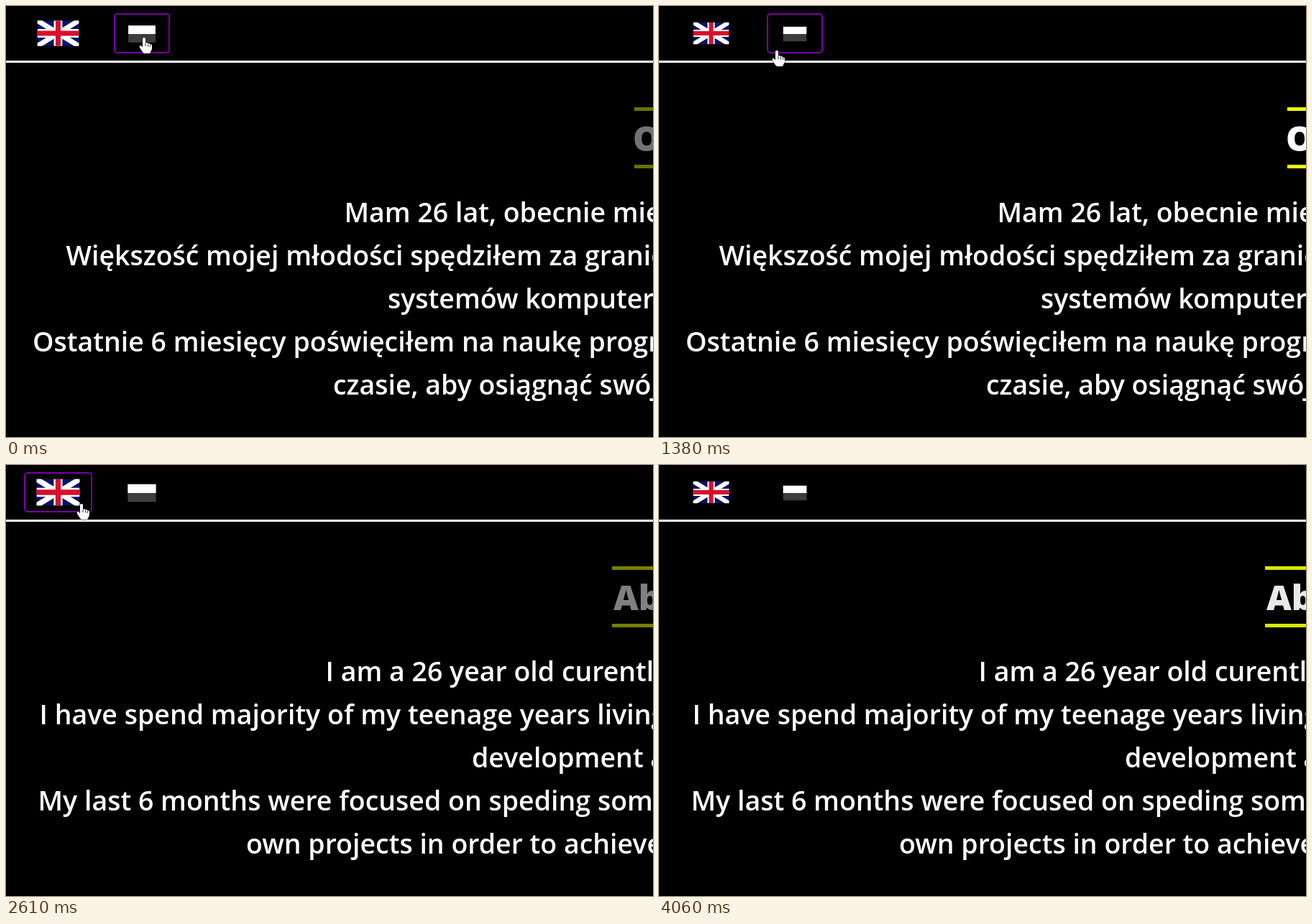
Recreate the animation shown at these times as an HTML page. Size 900x600 px, loop 4080 ms.

```html
<!DOCTYPE html>
<html lang="pl">
<head>
<meta charset="utf-8">
<title>Language switch</title>
<style>
  html, body { margin: 0; width: 100%; height: 100%; overflow: hidden; background: #000; }
  svg { display: block; }
  text { font: 600 37.5px "Open Sans", "Noto Sans", sans-serif; fill: #fff; }
  .title text { font-weight: 800; font-size: 48px; }
  .title rect { fill: #ebff00; }
  .box { fill: none; stroke: #7800a5; stroke-width: 2; }
</style>
</head>
<body>
<svg width="900" height="600" viewBox="0 0 900 600">
  <rect y="76" width="900" height="3" fill="#fff"/>

  <rect class="box" x="26" y="11" width="93" height="54" rx="4"/>
  <rect class="box" x="151" y="11" width="76" height="54" rx="4"/>

  <svg x="0" y="0" width="900" height="76">
    <g class="flag" data-at="72.5,38">
      <clipPath id="edge"><rect x="-24.5" y="-15" width="49" height="30"/></clipPath>
      <g clip-path="url(#edge)">
        <rect x="-24.5" y="-15" width="49" height="30" fill="#04146e"/>
        <path d="M-24.5-15L24.5 15M-24.5 15L24.5-15" stroke="#fff" stroke-width="6"/>
        <path d="M0-15V15M-24.5 0H24.5" stroke="#fff" stroke-width="10"/>
        <path d="M0-15V15M-24.5 0H24.5" stroke="#d8102c" stroke-width="6"/>
      </g>
    </g>
    <g class="flag" data-at="189,39">
      <rect x="-16" y="-10" width="32" height="20" fill="#3d3d3d"/>
      <rect x="-16" y="-10" width="32" height="10" fill="#fff"/>
    </g>
  </svg>

  <g class="page"></g>
  <g class="page"></g>

  <g id="hand">
    <path d="M-2 1Q0-1 2 1V8Q4 6 5.5 8.5Q7.5 7 8.5 9.5Q11 8.5 11 12V16L9 20Q9 22 7 22H1Q-1 22-2 20L-6 14Q-7 10-4 11.500L-2 13Z"
      fill="#fff" stroke="#000" stroke-width="1" paint-order="stroke"/>
    <path d="M2 8V12M5.500 9V12.500M8.500 10V13" stroke="#000" stroke-width=".8"/>
  </g>
</svg>
<script>
const LOOP = 4080, PERIOD = 960, SWITCH = 2300, EXIT = 3230;

const pages = [
  { left: 874, title: [872, "O mnie"], lines: [
    [470.5, "Mam 26 lat, obecnie mieszkam"],
    [83.5, "Większość mojej młodości spędziłem za granicą"],
    [531, "systemów komputerowych"],
    [37, "Ostatnie 6 miesięcy poświęciłem na naukę programowania"],
    [455, "czasie, aby osiągnąć swój cel"]] },
  { left: 843, title: [845, "About me"], lines: [
    [444.5, "I am a 26 year old curently"],
    [46.5, "I have spend majority of my teenage years living"],
    [648, "development and"],
    [44.5, "My last 6 months were focused on speding some time"],
    [334, "own projects in order to achieve my"]] }
];

// Pointer tip: time, x, y
const path = [
  [0, 192, 44], [860, 214, 51], [1380, 164, 62], [1980, 98, 51],
  [2610, 105, 54], [2800, 108, 60], [EXIT, 150, 560]
];

const all = s => [...document.querySelectorAll(s)];
const groups = all(".page"), flags = all(".flag"), boxes = all(".box");
const hand = document.getElementById("hand");
const show = (el, on) => el.setAttribute("visibility", on ? "visible" : "hidden");
const label = ([x, s], y) => `<text x="${x}" y="${y}">${s}</text>`;

pages.forEach((p, i) => {
  const bar = y => `<rect x="${p.left}" y="${y}" width="200" height="5"/>`;
  groups[i].innerHTML =
    `<g class="title">${bar(141)}${bar(221)}${label(p.title, 202)}</g>` +
    p.lines.map((l, n) => label(l, 301 + 60 * n)).join("");
});
const titles = all(".title");

// CSS "ease": cubic-bezier(.25, .1, .25, 1)
function ease(x) {
  const bez = (a, b, u) => 3 * a * u * (1 - u) ** 2 + 3 * b * u * u * (1 - u) + u ** 3;
  let lo = 0, hi = 1;
  for (let i = 0; i < 20; i++) {
    const mid = (lo + hi) / 2;
    if (bez(.25, .25, mid) < x) lo = mid; else hi = mid;
  }
  return bez(.1, 1, lo);
}

// Falls from 1 to 0, then rises back, over one cycle
function pulse(phase) {
  const u = 2 * (phase - Math.floor(phase));
  return u < 1 ? 1 - ease(u) : ease(u - 1);
}

function pointer(t) {
  const i = Math.max(1, path.findIndex(k => k[0] >= t));
  const [a, b] = [path[i - 1], path[i]];
  const u = (t - a[0]) / (b[0] - a[0]);
  return [1, 2].map(n => a[n] + (b[n] - a[n]) * u);
}

function draw(t) {
  const phase = .095 + t / PERIOD;
  const scale = 1 + .25 * pulse(phase);
  flags.forEach(f => f.setAttribute("transform", `translate(${f.dataset.at}) scale(${scale})`));
  titles.forEach(g => g.setAttribute("opacity", 1 - .6 * pulse(phase + .95)));
  groups.forEach((g, i) => show(g, i === +(t >= SWITCH)));

  const inside = t < EXIT;
  const [x, y] = inside ? pointer(t) : [-99, -99];
  show(hand, inside);
  hand.setAttribute("transform", `translate(${x} ${y})`);
  show(boxes[0], y < 66 && x >= 25 && x < 120);
  show(boxes[1], y < 66 && x >= 150 && x < 228);
}

const start = performance.now();
function tick() {
  draw((performance.now() - start) % LOOP);
  requestAnimationFrame(tick);
}
tick();
</script>
</body>
</html>
```
